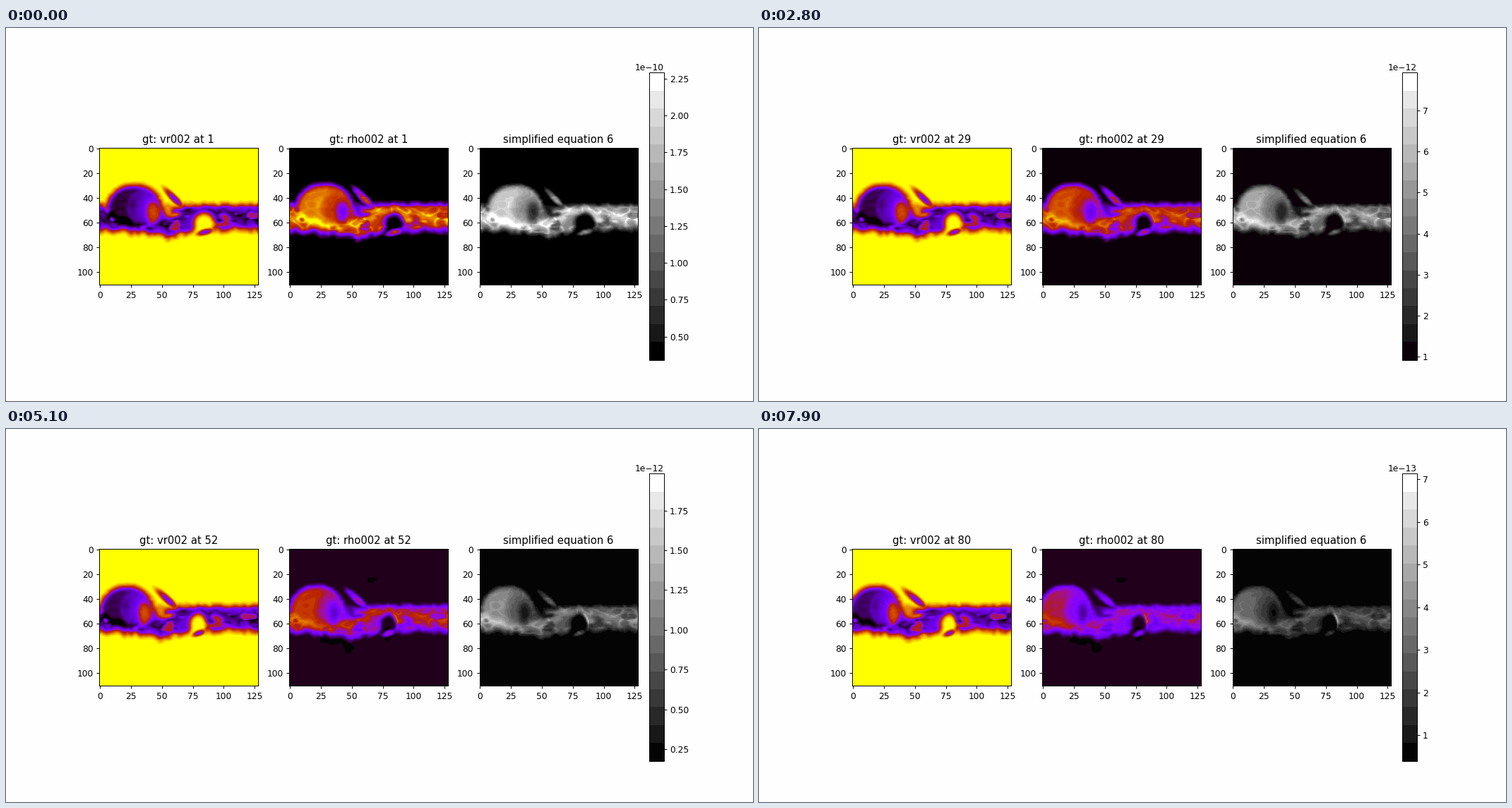
A matplotlib script for the animation above (8 s loop, 1058 by 529 pixels).

```python
import numpy as np
import matplotlib.pyplot as plt
from matplotlib.animation import FuncAnimation
from matplotlib.colors import ListedColormap

FRAMES, ROWS, COLS = 80, 111, 128
rng = np.random.default_rng(11)

# ---------- pattern grid, wider than the view so it can drift left ----------
u = np.arange(0, 146, 0.5)
U, V = np.meshgrid(u, np.arange(ROWS, dtype=float))


def bump(x, c, w):
    return np.exp(-((x - c) / w) ** 2)


def step(x, c, w):
    return 1 / (1 + np.exp((c - x) / w))


def radius(cx, cy, rx, ry, deg=0):
    t = np.radians(deg)
    dx, dy = U - cx, V - cy
    return np.hypot((dx * np.cos(t) + dy * np.sin(t)) / rx,
                    (dy * np.cos(t) - dx * np.sin(t)) / ry)


def blob(*shape):
    return np.exp(-radius(*shape) ** 3)


def blur(a, sx, sy):
    for axis, s in ((0, sy), (1, sx * 2)):
        r = int(4 * s) + 1
        k = bump(np.arange(-r, r + 1), 0, s * 2 ** 0.5)
        pad = [(0, 0), (0, 0)]
        pad[axis] = (r, r)
        a = np.apply_along_axis(np.convolve, axis, np.pad(a, pad, mode="edge"),
                                k / k.sum(), "valid")
    return a


def noise(sx, sy):
    a = blur(rng.standard_normal(U.shape), sx, sy)
    return a / a.std()


# Cloud mask: a rugged band with a round bubble on its left and a hole
rugged = np.sin(0.63 * u + 2 * np.sin(0.21 * u)) + 0.6 * np.sin(1.3 * u)
rim = radius(28, 48, 22, 18)
hole = radius(84, 61, 8.5, 8.5)
top = 46.5 + 2 * bump(u, 60, 8) - rugged
bottom = 66 + 6 * bump(u, 56, 12) + 2 * bump(u, 30, 15) + 1.6 * rugged
band = (V > top) & (V < bottom) & (hole > 1)
band &= ~((np.abs(U - 84) < 6) & (V > 61))
cloud = blur((band | (rim < 1)).astype(float), 1.7, 1.9)

inside = step(-rim, -0.95, 0.04)
outside = 1 - inside
cloud *= 1 - 0.75 * blob(55, 51, 4, 6, -20) * outside
cloud *= 1 - 0.7 * blob(61, 54, 4, 2, -15)
cloud *= 1 - 0.5 * blob(101, 56, 4.5, 2.5, 25)
cloud *= 1 - 0.4 * outside * np.clip(noise(2.2, 1.5) - 0.7, 0, 1)
cloud = np.maximum(cloud, 0.85 * blob(60, 41, 10.5, 2.5, 46))
cloud = np.maximum(cloud, 0.85 * blob(85, 68, 6.5, 2.2, -15))

# Inner structure
spine_y = 56 + 8 * bump(u, 38, 20) - 7 * bump(u, 81, 11) + np.sin(0.5 * u)
spine = bump(V, spine_y, 3.6)
core = blob(43, 52, 5.5, 9)
disk = blob(39, 50, 12, 14)
ring = bump(rim, 0.94, 0.07) * step(U, 32, 3)
arc = bump(radius(33, 48, 10, 11), 1, 0.2) * step(-U, -30, 2)
knot = bump(hole, 1.12, 0.13) * step(U, 89, 0.7) * step(-V, -63, 0.7)
ridge = (bump(noise(2.8, 1.5), 0, 0.5) - 0.45) * (1 - 0.75 * inside)

texture = 0.74 + 0.28 * spine + 0.12 * inside + 0.08 * arc + 0.13 * ring
texture = (texture + 0.26 * ridge) * (1 - 0.6 * core) * (1 - 0.3 * disk)
lean = step(-U, -24, 6)
depth = 0.9 + 0.08 * spine + 0.07 * inside * step(-U, -32, 4) + 0.09 * ridge
depth = depth - 0.46 * core - 0.1 * disk - 0.08 * ring - 0.05 * arc
halo = blur(cloud, 4, 4)
lobes = noise(3.5, 4.5)

X, Y = np.meshgrid(np.arange(COLS, dtype=float), np.arange(ROWS, dtype=float))


def drift(field, p):
    x = X[0]
    shift = 8 + 3 * bump(x, 38, 12) + 3 * bump(x, 90, 8) - 3 * bump(x, 72, 8)
    pos = 2 * (x + p * shift)
    i = pos.astype(int)
    f = pos - i
    return field[:, i] * (1 - f) + field[:, i + 1] * f


# ---------- colours in 16 steps per channel ----------
def stepped(name, dark):
    lut = plt.get_cmap(name)(np.arange(256))[:, :3]
    bins = np.minimum((lut * 16).astype(int), 15)
    key = bins @ [256, 16, 1]
    out = np.array([lut[key == k].mean(axis=0) for k in key])
    if name == "gray":
        out[:16], out[240:] = dark, 1
    else:
        out[:4], out[250:] = dark, (1, 1, 0)
    return ListedColormap(out)


DARKS = {"black": (0, 0, 0), "dim": (12, 0, 8), "mixed": (12, 0, 8),
         "purple": (4, 4, 4)}
MAPS = {k: [stepped(m, np.array(c) / 255) for m in ("gnuplot", "gray")]
        for k, c in DARKS.items()}


def phase(n):
    if n < 8:
        return "black"
    if 61 <= n < 73:
        return "mixed"
    return "purple" if 18 <= n < 29 or n >= 45 else "dim"


def backdrop(n, p, glow):
    """Faint level around the cloud, lying near the first colour step."""
    kind = phase(n)
    if kind == "purple":
        faint = (drift(lobes, p) > 1.25) & (np.abs(Y - 54) < 31)
        return np.where(faint, 0.004, 0.022)
    if kind == "mixed":
        edge = 49 - 3 * np.tanh((X - 60) / 8) * (Y < 54) + 2 * np.sin(X / 17)
        strip = (np.abs(X - 52) < 5) & (Y < 50)
        lit = (np.abs(Y - 55) > edge) | strip | (glow > 0.02)
        return np.where(lit, 0.022, 0.004)
    return np.zeros(X.shape)


# ---------- colour scale over time: smooth curve through key peaks ----------
KEYS = np.array([1, 14, 22, 37, 52, 69, 80])
PEAKS = [2.29e-10, 3.45e-11, 1.486e-11, 4.351e-12, 1.981e-12, 1.0405e-12, 7.124e-13]
CURVE = np.polyfit(KEYS / 40 - 1, np.log(PEAKS), 6)


def limits(n):
    hi = np.exp(np.polyval(CURVE, n / 40 - 1))
    return hi * (0.15 - 0.00118 * n), hi


def fields(n):
    p = (n - 1) / (FRAMES - 1)
    mask, fil, glow = (drift(a, p) for a in (cloud, knot, halo))
    speed = 1 - mask * np.clip(drift(depth, p) - 0.03 * p, 0, 0.995)
    tex = drift(texture * (1 + 0.3 * p * (lean - 0.4)), p)
    dens = mask * ((0.92 - 0.0055 * n) * tex * (1 - fil) + 0.97 * fil)
    gray = np.clip((dens - 0.04) / 0.92, 0, 1) ** 1.1
    return (np.clip(speed, 0, 1),
            np.clip(np.maximum(dens, backdrop(n, p, glow)), 0, 1), gray)


# ---------- figure ----------
fig, axes = plt.subplots(1, 3, figsize=(12, 6), dpi=88.167)
fig.set_facecolor("#fefefe")
blank = np.zeros((ROWS, COLS))
ims = [ax.imshow(blank, cmap=MAPS["black"][i // 2], vmin=0, vmax=1)
       for i, ax in enumerate(axes)]
for ax in axes:
    ax.set_xticks(range(0, COLS, 25))
ims[2].set_clim(*limits(1))
fig.colorbar(ims[2], ax=list(axes), fraction=0.05, pad=0.02)
axes[2].set_title("simplified equation 6")


def draw(i):
    n = i + 1
    speed, dens, gray = fields(n)
    lo, hi = limits(n)
    ims[2].set_clim(lo, hi)
    for im, data, m in zip(ims, (speed, dens, lo + gray * (hi - lo)), (0, 0, 1)):
        im.set_data(data)
        im.set_cmap(MAPS[phase(n)][m])
    axes[0].set_title(f"gt: vr002 at {n}")
    axes[1].set_title(f"gt: rho002 at {n}")
    return ims


anim = FuncAnimation(fig, draw, frames=FRAMES, init_func=lambda: draw(0),
                     interval=100, repeat=True, repeat_delay=0, blit=False)
plt.show()
```
